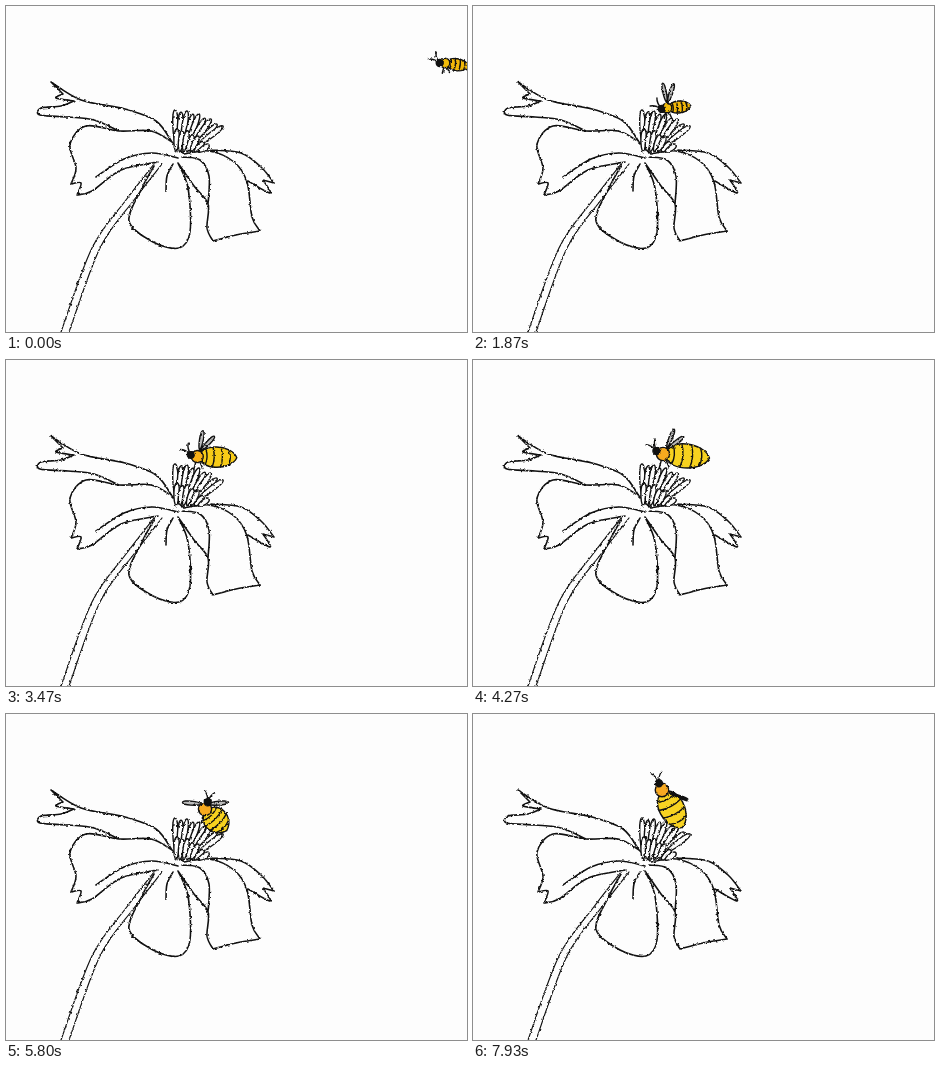
An HTML page that plays this animation: 461 by 326 pixels, repeating every 8000 ms.

```html
<!DOCTYPE html>
<html lang="en">
<head>
<meta charset="utf-8">
<title>Bee on a flower</title>
<style>
  html, body { margin: 0; width: 100%; height: 100%; overflow: hidden; background: #fdfdfd; }
  svg { display: block; width: 100vw; height: 100vh; }
  g { stroke: #111; stroke-linecap: round; stroke-linejoin: round; }
</style>
</head>
<body>
<svg viewBox="0 0 461 326">
  <filter id="ink" filterUnits="userSpaceOnUse" x="0" y="0" width="461" height="326" color-interpolation-filters="sRGB">
    <feTurbulence id="noise" type="fractalNoise" baseFrequency=".4" numOctaves="1" seed="1"/>
    <feDisplacementMap in="SourceGraphic" scale="3" xChannelSelector="R" yChannelSelector="G"/>
  </filter>
  <g filter="url(#ink)">
    <g id="flower" fill="none" stroke-width="1.6"></g>
    <g id="stamens" fill="#fdfdfd" stroke-width="1.4"></g>
    <g id="bee" stroke-width="1.4"></g>
  </g>
</svg>
<script>
const LOOP = 8000, STEPS = 120, STEP = LOOP / STEPS, LANDING = 1750;
const $ = id => document.getElementById(id);
const mix = (a, b, k) => a + (b - a) * k;
const range = (count, make) => Array.from({ length: count }, (_, i) => make(i, i / (count - 1))).join('');
const polar = (deg, r) => [r * Math.cos(deg * Math.PI / 180), r * Math.sin(deg * Math.PI / 180)];
const add = (p, q) => [p[0] + q[0], p[1] + q[1]];
const pt = p => p.map(v => v.toFixed(2)).join(' ');

// Smooth stroke through points such as '10,20 30,40'
function stroke(text, dx = 0) {
  const p = text.split(' ').map(s => add(s.split(',').map(Number), [dx, 0]));
  let d = 'M' + pt(p[0]);
  for (let i = 1; i < p.length; i++) {
    const a = p[i - 1], b = p[i], before = p[i - 2] || a, after = p[i + 1] || b;
    const pull = (from, to, base, s) => [0, 1].map(j => base[j] + s * (to[j] - from[j]) / 6);
    d += `C${pt(pull(before, b, a, 1))} ${pt(pull(a, after, b, -1))} ${pt(b)}`;
  }
  return d;
}

// Blunt leaf from root to tip, for stamens and wings
function leaf(root, tip, w) {
  const d = [tip[0] - root[0], tip[1] - root[1]], len = Math.hypot(...d) || 1;
  const at = (k, s) => pt([0, 1].map(j => root[j] + d[j] * k + (j ? d[0] : -d[1]) / len * w * .66 * s));
  return `M${pt(root)}C${at(.2, .8)} ${at(1, 1)} ${pt(tip)}C${at(1, -1)} ${at(.2, -.8)} ${pt(root)}Z`;
}

const petals = [
  // back left
  '166,136 150,115 119,103 75,94 45,76', '45,76 57,88', '57,88 50,92 68,95',
  '68,95 55,100 35,102 34,109 62,111 88,114 113,125', '166,136 178,148',
  // left
  '166,136 145,125 113,125 80,120 64,138 70,162 65,178', '65,178 75,177 71,189',
  '71,189 86,185 115,164 152,156', '90,171 118,153 146,147 172,152',
  // lower
  '148,160 136,182 123,215 147,236 173,242 184,226 182,182 172,157', '167,158 161,170 160,185',
  // right
  '172,157 188,180 202,198 201,222 207,235', '207,235 230,229 254,225',
  '254,225 246,211 241,176 228,156 203,145 178,148', '176,151 194,154 203,170 202,198',
  // far right
  '205,144 235,147 255,161 268,177', '268,177 257,174', '257,174 264,187 242,175'
];
const stem = '152,158 124,194 90,242 59,326';

$('flower').innerHTML =
  `<path d="${petals.map(p => stroke(p)).join('')}"/>` +
  `<path stroke-width="1.2" d="${stroke(stem, -4)}${stroke(stem, 4)}"/>`;

const stamenRow = (count, left, right, height, rootY, w) => range(count, (i, k) => {
  const tip = [mix(left, right, k), rootY - height + 16 * k * k + i % 2 * 2];
  return `<path d="${leaf([mix(170, 192, k), rootY], tip, w)}"/>`;
});
$('stamens').innerHTML = stamenRow(9, 169, 217, 35, 139, 6) + stamenRow(7, 171, 203, 23, 146, 6);

// Angles in degrees: turn of the belly, look of the head, wing direction and spread
const front = { x: 199, y: 95, len: 28, wid: 24, turn: 45, look: 292, wing: -90, spread: 85 };
const rise = { x: 189, y: 76, len: 40, wid: 25, turn: 62, look: 245, wing: 21, spread: 2 };
const feed = { x: 190, y: 94, len: 44, wid: 24, turn: 5, look: 205, wing: -53, spread: 12 };
const land = { x: 194, y: 102, len: 22, wid: 12, turn: -5, look: 170, wing: -87, spread: 13 };
const fly = { ...land, turn: 8, look: 180, wing: -24, spread: 7 };
const dive = { ...fly, turn: 60, look: 140, wing: -7 };
const acts = [
  [0, 0, fly], [1130, 1130, dive], [LANDING, 2900, land], [3800, 4300, feed],
  [4850, 5050, rise], [5500, 7450, front], [7900, LOOP, rise]
];

function poseAt(t) {
  const i = acts.findLastIndex(([from]) => from <= t);
  const [, end, a] = acts[i], [next, , b] = acts[i + 1] || acts[i];
  const u = t > end ? (t - end) / (next - end) : 0, k = u * u * (3 - 2 * u);
  const pose = {};
  for (const name in a) pose[name] = mix(a[name], b[name], k);
  pose.spread *= 1 + .34 * Math.sin(Math.PI * (t - 5800) / 933) ** 2;
  if (t < LANDING) {
    const f = t / LANDING;
    pose.x = mix(land.x, 439, (1 - f) ** 1.33);
    pose.y = mix(57, land.y, f) - 39 * Math.sin(Math.PI * f);
  }
  return pose;
}

function belly(len, wid) {
  const a = len / 2, b = wid / 2, h = wid * .667, c = a * .7;
  const shape = `M${-a} 0C${-a} ${-h} ${c} ${-h} ${a} 0C${c} ${h} ${-a} ${h} ${-a} 0Z`;
  const stripes = range(4, i => {
    const u = .27 + i * .16, v = 1 - u;
    const x = a * (u ** 3 - v ** 3 - 3 * v * v * u) + 3 * c * v * u * u, y = 4 * b * u * v;
    return `M${pt([x, -y])}Q${pt([x + wid * .16, 0])} ${pt([x, y])}`;
  });
  return [shape, stripes];
}

function beeSvg(p, wingsOn) {
  const r = 3 + p.wid * .15, grown = (p.wid - 12) / 13;
  const paint = (small, big) => `hsl(${mix(small, big, grown)} 93% ${mix(49, 55, grown)}%)`;
  const [shape, stripes] = belly(p.len, p.wid);
  const head = polar(p.look, r * 1.1), lean = (p.look + 270) / 2;
  const feelers = [-26, 26].map(s => {
    const end = add(head, polar(lean + s, 12)), bend = add(head, polar(lean + s / 3, 8));
    return `M${pt(head)}Q${pt(bend)} ${pt(end)}`;
  }).join('');
  const legs = [65, 105].map(deg => `M${pt(polar(deg, r))}L${pt(polar(deg, r * 2.2))}`).join('');
  const wings = [-1, 1].map(s => {
    const deg = p.wing + s * p.spread;
    const root = add(polar(p.wing, r * .7), polar(deg, r * .4));
    return leaf(root, add(root, polar(deg, 20)), Math.min(4.5, 1 + p.spread * .2));
  }).join('');
  return `<g transform="translate(${p.x} ${p.y})">
    <path d="${legs}"/>
    <g transform="translate(${pt(polar(p.turn, p.len / 2 + r * .4))}) rotate(${p.turn})">
      <path fill="${paint(45, 50)}" d="${shape}"/>
      <path fill="none" d="${stripes}"/>
    </g>
    <circle r="${r}" fill="${paint(46, 38)}"/>
    ${wingsOn ? `<path fill="#bbb" d="${wings}"/>` : ''}
    <path fill="none" d="${feelers}"/>
    <circle cx="${head[0]}" cy="${head[1]}" r="3.5" fill="#111"/>
  </g>`;
}

let last = -1;
function draw(now) {
  const step = Math.min(STEPS - 1, Math.floor((now % LOOP + 20) / STEP));
  if (step !== last) {
    last = step;
    const t = step * STEP;
    $('noise').setAttribute('seed', 1 + step % 3);
    $('bee').innerHTML = beeSvg(poseAt(t), t > LANDING || step % 2);
  }
  requestAnimationFrame(() => draw(performance.now() - start));
}
const start = performance.now();
draw(0);
</script>
</body>
</html>
```
